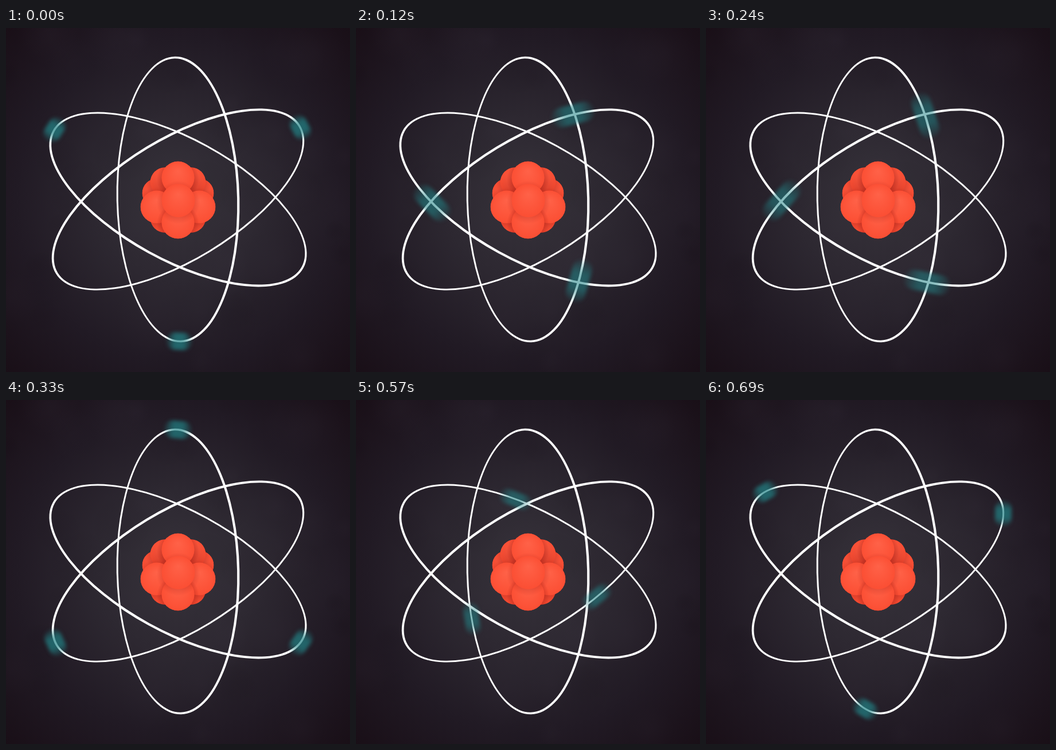
An HTML page with a canvas that plays this animation: 600 by 600 pixels, repeating every 720 ms.

```html
<!DOCTYPE html>
<html lang="en">
<head>
<meta charset="utf-8">
<title>Atom</title>
<style>
  html, body { margin: 0; width: 100%; height: 100%; overflow: hidden; background: #190f17; }
  canvas { display: block; }
</style>
</head>
<body>
<canvas id="stage" width="600" height="600"></canvas>
<script>
const SIZE = 600, LOOP = 720, STEP = 30, TURN = 2 * Math.PI;
const CX = 300, CY = 299, A = 247.5, B = 105.5, TILT = -0.022;
const ctx = document.getElementById('stage').getContext('2d');

function random(seed) {
  return () => (seed = (seed * 16807) % 2147483647) / 2147483647;
}

function disc(g, x, y, r, inner, outer, lift = 0) {
  const fill = g.createRadialGradient(x, y - r * lift, 0, x, y, r * (1 + lift / 4));
  fill.addColorStop(0, inner);
  fill.addColorStop(1, outer);
  g.fillStyle = fill;
  g.beginPath();
  g.arc(x, y, r, 0, TURN);
  g.fill();
}

function drawBackground(g) {
  const fill = g.createRadialGradient(300, 300, 0, 300, 300, 425);
  ['#36323a', '#2d2831', '#211a24', '#190f17'].forEach((color, i) => fill.addColorStop(i / 3, color));
  g.fillStyle = fill;
  g.fillRect(0, 0, SIZE, SIZE);
  const rnd = random(77);
  for (let i = 0; i < 60; i++) {
    const tone = i % 2 ? '70,62,76' : '14,8,14';
    disc(g, rnd() * SIZE, rnd() * SIZE, 20 + rnd() * 50, `rgba(${tone},.06)`, `rgba(${tone},0)`);
  }
}

// The ring is heavier on the near side, so its hole is shifted.
function drawRing(g) {
  const half = 1.8, shift = .6;
  g.beginPath();
  g.ellipse(0, 0, B + half, A + half, 0, 0, TURN);
  g.closePath();
  g.moveTo(B - half - shift, 0);
  g.ellipse(-shift, 0, B - half, A - half, 0, 0, TURN);
  g.fillStyle = '#fff';
  g.fill('evenodd');
}

// Ten balls stand 36 degrees apart around a middle one; the order runs from back to front.
function nucleusBalls() {
  const balls = [2, 4, 1, 0, 3, 5].flatMap((slot, order) => [-1, 1].map(side => {
    const angle = slot * TURN / 10;
    return {
      x: 300 + side * 39 * Math.sin(angle),
      y: 300 - 39 * Math.cos(angle),
      r: order < 3 ? 25.5 : 28.5
    };
  }));
  return [...balls, { x: 300.5, y: 301, r: 29 }];
}

function drawNucleus(g) {
  const balls = nucleusBalls(), outline = new Path2D();
  for (const { x, y, r } of balls) {
    outline.moveTo(x + r, y);
    outline.arc(x, y, r, 0, TURN);
  }
  g.save();
  g.clip(outline);
  balls.forEach(({ x, y, r }, i) => {
    if (i === 6) disc(g, 300, 304, 68, 'rgba(130,20,16,.75)', 'rgba(170,30,20,0)');
    disc(g, x, y + 3, r * 1.3, 'rgba(150,26,20,.75)', 'rgba(170,30,20,0)');
    disc(g, x, y, r, '#ff6248', '#fb4d32', .4);
  });
  g.restore();
}

function eachOrbit(g, draw) {
  for (let k = 0; k < 3; k++) {
    g.save();
    g.translate(CX, CY);
    g.rotate(TILT + k * TURN / 3);
    draw(g);
    g.restore();
  }
}

// A steady turn with a gentle sway: slower near the ring's tips, faster on the near side.
function angleAt(t) {
  const a = t / LOOP * TURN;
  return a + .058 - .13 * Math.cos(a - .37) + .054 * Math.cos(2 * a + .94);
}

// The smear grows with speed, the width with nearness.
function drawElectron(g, t) {
  const angle = angleAt(t), turn = angleAt(t + STEP / 2) - angleAt(t - STEP / 2);
  const sin = Math.sin(angle), cos = Math.cos(angle);
  const speed = turn * Math.hypot(A * sin, B * cos);
  const width = 30 + 5 * sin;
  const length = width + speed * (.62 + .1 * sin);
  const fill = g.createLinearGradient(-length / 2, 0, length / 2, 0);
  [.15, 1, 1, .15].forEach((k, i) =>
    fill.addColorStop(i / 3, `rgba(34,133,136,${k * (.8 - speed * .004)})`));
  g.translate(B * sin, A * cos);
  g.rotate(Math.atan2(-A * sin, B * cos));
  g.filter = 'blur(3px)';
  g.fillStyle = fill;
  g.beginPath();
  g.roundRect(-length / 2, -width / 2, length, width, width / 2);
  g.fill();
}

const scene = document.createElement('canvas');
scene.width = scene.height = SIZE;
const still = scene.getContext('2d');
drawBackground(still);
eachOrbit(still, drawRing);
drawNucleus(still);

function frame() {
  const t = Math.floor(performance.now() % LOOP / STEP) * STEP;
  ctx.drawImage(scene, 0, 0);
  eachOrbit(ctx, g => drawElectron(g, t));
  requestAnimationFrame(frame);
}
frame();
</script>
</body>
</html>
```
